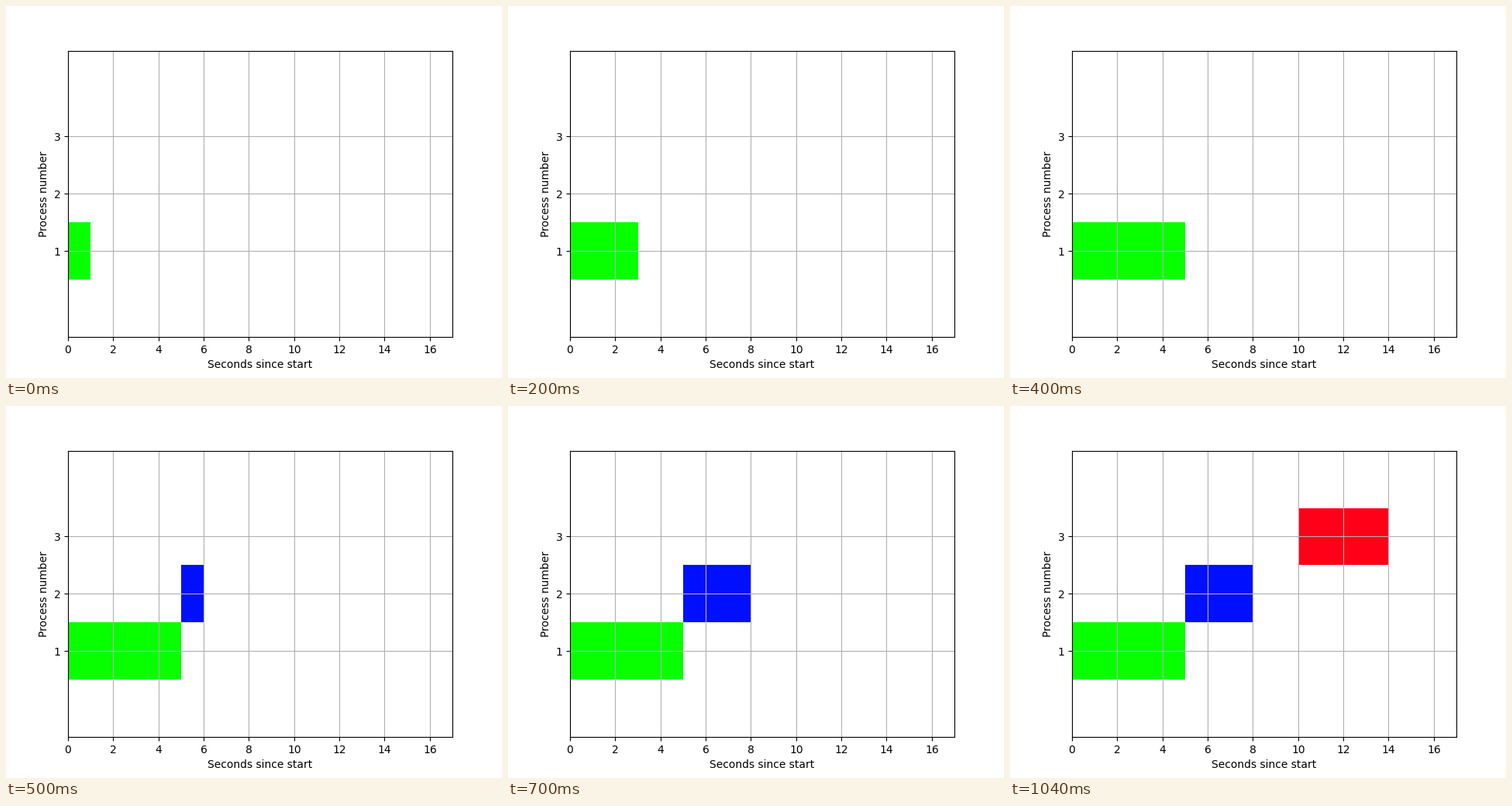
Animation, 640 px wide and 480 px high, one loop 1140 ms. Source, as a matplotlib script:

```python
import matplotlib.pyplot as plt
from matplotlib.animation import FuncAnimation
from matplotlib.patches import Rectangle

STEP = 20    # ms per frame
LOOP = 1140  # ms per loop
# Start and duration of each process, in seconds
JOBS = [(0, 5), (5, 3), (10, 4)]


def clock(ms):
    """Simulated seconds: one per 100 ms, with the idle gap skipped at 740 ms."""
    if ms < 740:
        return 1 + ms // 100
    return 11 + (ms - 740) // 100


fig, ax = plt.subplots(figsize=(6.4, 4.8), dpi=100)
ax.set(xlim=(0, 17), ylim=(-0.5, 4.5), yticks=[1, 2, 3],
       xlabel="Seconds since start", ylabel="Process number")
ax.grid(True)

bars = []
for k, (start, _) in enumerate(JOBS, 1):
    bar = Rectangle((start, k - 0.5), 0, 1, linewidth=0,
                    facecolor=plt.cm.hsv(k / len(JOBS)))
    bars.append(ax.add_patch(bar))


def draw(i):
    now = clock(i * STEP)
    for bar, (start, length) in zip(bars, JOBS):
        bar.set_width(min(max(now - start, 0), length))
        bar.set_visible(now > start)
    return bars


anim = FuncAnimation(fig, draw, frames=LOOP // STEP, interval=STEP,
                     init_func=lambda: draw(0), repeat=True, repeat_delay=0)
plt.show()
```
